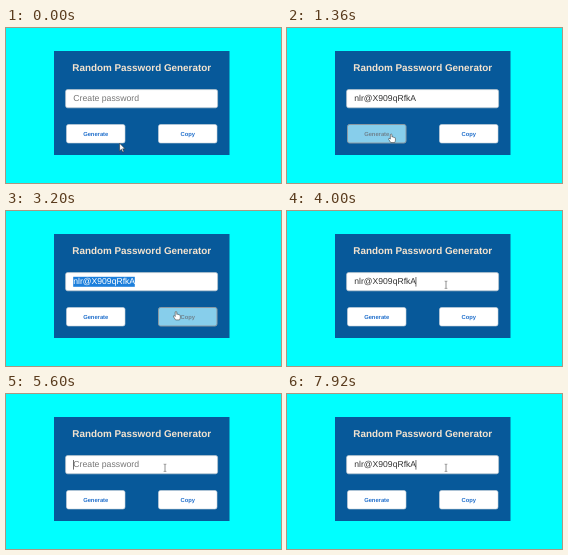
Animation, 275 px wide and 155 px high, one loop 8 s. Source, as an HTML page:

```html
<!DOCTYPE html>
<html lang="en">
<head>
<meta charset="utf-8">
<title>Random Password Generator</title>
<style>
  html, body { margin: 0; width: 100%; height: 100%; overflow: hidden; background: #0ff; }
  svg { display: block; width: 100%; height: 100%; }
  text { font-family: "Liberation Sans", Arial, sans-serif; text-rendering: geometricPrecision; }
  .title { font-size: 9.9px; font-weight: bold; fill: #f3e3cf; text-anchor: middle; }
  .value { font-size: 8.6px; fill: #333; }
  .value.empty { font-size: 8.7px; fill: #757575; }
  .value.selected { fill: #fff; }
  .button rect { fill: #fff; stroke: #c9d3dc; stroke-width: .6; }
  .button text { font-size: 5.8px; font-weight: bold; fill: #2270cc; text-anchor: middle; }
  .button.hover rect { fill: #87ceeb; stroke: #8a99a3; stroke-width: 1; }
  .button.hover text { fill: #6f838f; }
  .pointer { stroke-linejoin: round; }
</style>
</head>
<body>
<svg viewBox="0 0 275 155">
  <rect width="275" height="155" fill="#0ff"/>
  <rect x="48" y="23" width="175.5" height="104" fill="#07599a"/>
  <text class="title" x="135.7" y="43.2">Random Password Generator</text>
  <rect x="59.6" y="61.6" width="152" height="18.2" rx="2" fill="#fff" stroke="#b9c4cd" stroke-width=".7"/>
  <rect id="selection" x="67.2" y="65.8" width="61.6" height="10" fill="#1c7fdc"/>
  <text id="value" class="value" x="67.3" y="73.4"></text>
  <rect id="caret" y="66" width=".7" height="9.6" fill="#333"/>
  <g id="generate" class="button">
    <rect x="60.5" y="96.5" width="58.5" height="18.5" rx="2"/>
    <text x="89.7" y="108">Generate</text>
  </g>
  <g id="copy" class="button">
    <rect x="152.5" y="96.5" width="58.5" height="18.5" rx="2"/>
    <text x="181.8" y="108">Copy</text>
  </g>
  <g id="cursor">
    <path id="arrow" class="pointer" d="M0 0V7.6L1.8 6L3.1 8.8L4.3 8.2L3 5.5H5.4Z" fill="#fff" stroke="#222" stroke-width=".5"/>
    <path id="hand" class="pointer" d="M-.8 .6Q0 -.5 .8 .6V3.1Q1.6 2.6 2.1 3.3Q2.9 2.9 3.3 3.7Q4.3 3.4 4.3 4.6V6.2Q4.2 7.4 3.5 8.6H-.4L-2.5 5.4Q-2.7 4.1 -1.5 4.5L-.8 5.2Z" fill="#fff" stroke="#222" stroke-width=".5"/>
    <path id="beam" d="M-1.3 -3.6H-.4L0 -3.2L.4 -3.6H1.3M0 -3.2V3.2M-1.3 3.6H-.4L0 3.2L.4 3.6H1.3" fill="none" stroke="#555" stroke-width=".65"/>
  </g>
</svg>
<script>
  const LOOP = 8000, PASSWORD = "nlr@X909qRfkA", HINT = "Create password";
  const $ = id => document.getElementById(id);

  // time, x, y of the pointer's hot spot
  const path = [
    [0, 113.6, 115.3], [80, 113.6, 115.3], [400, 106, 112], [720, 99.5, 110.6],
    [1280, 99.5, 110.6], [1760, 127, 83], [2000, 134, 74.5], [2080, 134, 74.5],
    [2400, 170, 100.3], [3280, 170, 100.3], [3600, 159, 73.8], [LOOP, 159, 73.8]
  ];

  // time, text, selected, caret
  const field = [
    [0, "", false, false], [1040, PASSWORD, false, false], [2720, PASSWORD, true, false],
    [4000, PASSWORD, false, true], [4480, PASSWORD, false, false], [5040, PASSWORD, false, true],
    [5280, PASSWORD, true, false], [5520, "", false, true], [6080, "", false, false],
    [6640, "", false, true], [6800, PASSWORD, false, true],
    [7360, PASSWORD, false, false], [7920, PASSWORD, false, true]
  ];

  const lastStep = (steps, t) => steps.findLastIndex(s => s[0] <= t);
  const show = (id, on) => $(id).setAttribute("visibility", on ? "visible" : "hidden");
  const inside = (x, y, l, t, r, b) => x >= l && x <= r && y >= t && y <= b;

  function pointerAt(t) {
    const i = lastStep(path, t);
    const [t0, x0, y0] = path[i], [t1, x1, y1] = path[i + 1];
    const k = (t - t0) / (t1 - t0);
    return [x0 + (x1 - x0) * k, y0 + (y1 - y0) * k];
  }

  function render(t) {
    const [, text, selected, caret] = field[lastStep(field, t)];
    const value = $("value");
    value.textContent = text || HINT;
    value.setAttribute("class", "value" + (text ? "" : " empty") + (selected ? " selected" : ""));
    show("selection", selected);
    show("caret", caret);
    $("caret").setAttribute("x", text ? 128.6 : 67);

    const [x, y] = pointerAt(t);
    const onGenerate = inside(x, y, 60, 96, 119, 115);
    const onCopy = inside(x, y, 152, 96, 211, 115);
    const onField = inside(x, y, 59, 61, 212, 80);
    $("generate").classList.toggle("hover", onGenerate);
    $("copy").classList.toggle("hover", onCopy);
    $("cursor").setAttribute("transform", `translate(${x} ${y})`);
    show("hand", onGenerate || onCopy);
    show("beam", onField);
    show("arrow", !(onGenerate || onCopy || onField));
  }

  const start = performance.now();
  function tick() {
    render((performance.now() - start) % LOOP);
    requestAnimationFrame(tick);
  }
  tick();
</script>
</body>
</html>
```
